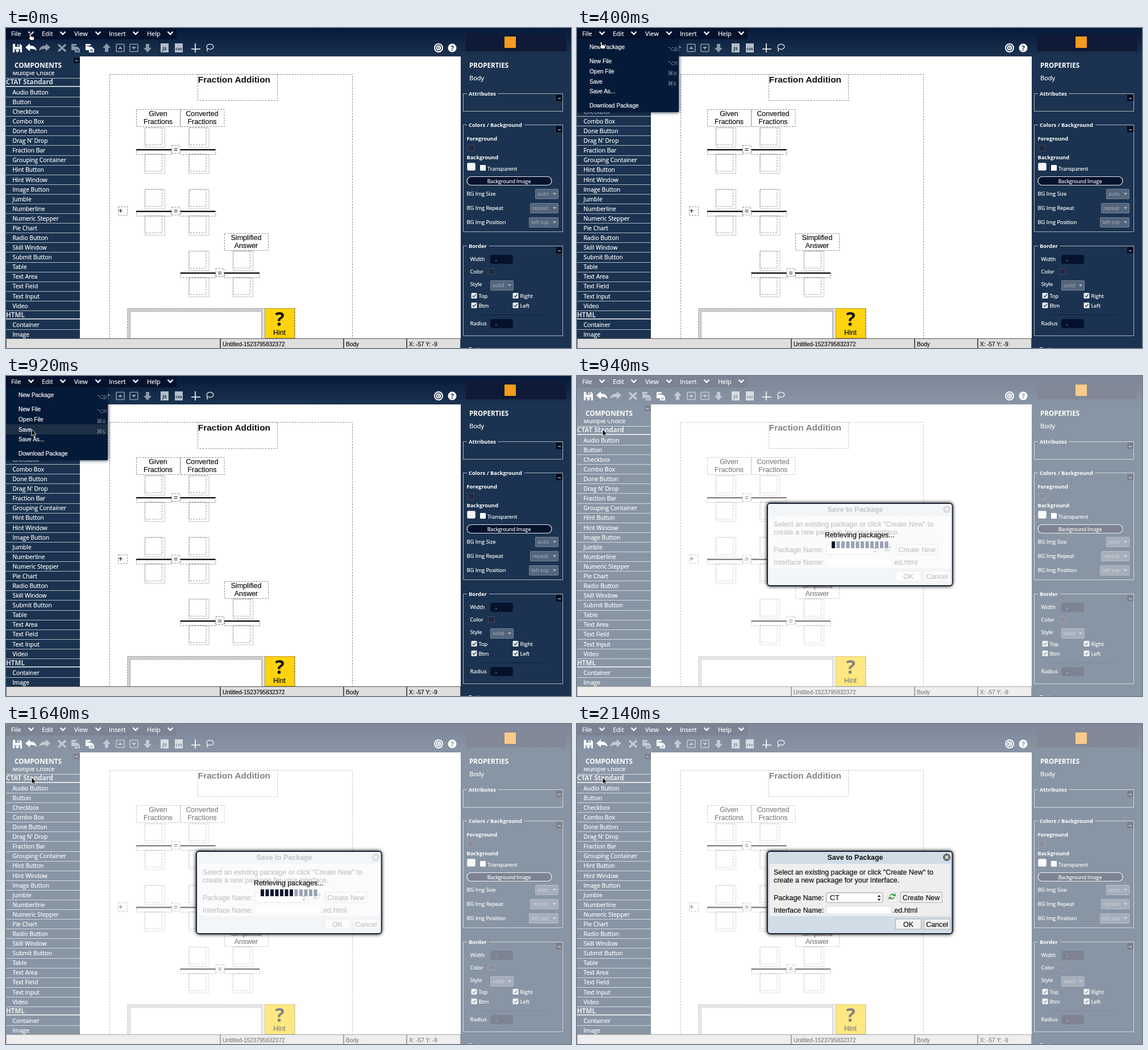
An HTML page that plays this animation: 994x563 px, repeating every 2180 ms.

```html
<!DOCTYPE html>
<html lang="en">
<head>
<meta charset="utf-8">
<title>Interface editor: saving to a package</title>
<style>
html, body { margin: 0; width: 100%; height: 100%; overflow: hidden; background: #fff; }
svg { display: block; width: 994px; height: 563px; }
text {
  font-family: "Open Sans", "Noto Sans", sans-serif; white-space: pre;
  color: #fff; fill: currentColor; stroke: currentColor; stroke-width: .2;
}
.b { font-weight: 700; stroke: none; }
.a { font-family: "Liberation Sans", Arial, sans-serif; color: #111; }
.w { color: #fff; fill: #fff; }
.g { fill: #8b97a8; }
.h { color: #d3d9e0; }
.m { text-anchor: middle; }
.k { font-family: "DejaVu Sans", sans-serif; color: #8a93a3; stroke: none; }
.muted { color: #a9b3c0; stroke: none; }
.navy { color: #1b3350; }
.help { font-family: "Open Sans", "Noto Sans", sans-serif; }
.dash { fill: none; stroke: #888; stroke-dasharray: 3 2; }
.line { fill: none; stroke: #fff; stroke-width: 2; }
.dim { fill: none; stroke: #8b97a8; stroke-width: 2; }
</style>
</head>
<body>
<svg id="stage" viewBox="0 0 994 563"></svg>
<script>
const PANEL = '#1b3350', DARK = '#05122d';

// y is the middle of the capital letters
const text = (x, y, s, size, cls = '') =>
  `<text x="${x}" y="${(y + size * .36).toFixed(2)}" font-size="${size}" class="${cls}">${s}</text>`;
const rect = (x, y, w, h, fill, more = '') =>
  `<rect x="${x}" y="${y}" width="${w}" height="${h}" fill="${fill}" ${more}/>`;
const dash = (x, y, w, h) => `<rect x="${x + .5}" y="${y + .5}" width="${w}" height="${h}" class="dash"/>`;
const path = (d, cls = '', more = '') => `<path d="${d}" class="${cls}" ${more}/>`;
const group = (id, s, more = '') => `<g id="${id}" ${more}>${s}</g>`;
const each = (list, f) => list.map(f).join('');

function header() {
  const menus = [['File', 9, 44], ['Edit', 63, 100], ['View', 120, 162], ['Insert', 181, 228], ['Help', 248, 289]];
  return rect(0, 0, 994, 563, PANEL) + rect(0, 0, 994, 50, 'url(#top)') + rect(0, 0, 300, 20, DARK) +
    each(menus, ([s, x, v]) => text(x, 10, s, 11) +
      path(`M${v - 4.5} 6.5l4.5 4.5 4.5-4.5`, 'line', 'style="stroke-width:2.4"')) +
    rect(809, 10, 176.5, 31, '#0f1a37') + rect(877, 15, 20, 20, '#f49a1e');
}

function toolbar() {
  const arrow = (x, dir) => path(`M${x} ${35 - 8 * dir}l7 ${8 * dir}h-4v${7 * dir}h-6v${-7 * dir}h-4z`, 'g');
  const boxed = (x, dir) => rect(x - 7, 28.5, 14, 13, 'none', 'stroke="#8b97a8" stroke-width="1.6" rx="1"') +
    path(`M${x} ${35 - 3 * dir}l4 ${5 * dir}h-8z`, 'g');
  const badge = (x, s, size) => rect(x - 7, 27, 14, 16, '#b4bdc9') + text(x, 36, s, size, 'b m navy');
  const sheets = (x, cls) => path(`M${x - 7} 28h9v3h-3v8h-6z`, cls) + path(`M${x - 1} 33h5l4 4v6h-9z`, cls) +
    rect(x - 5, 31, 4, 1, PANEL) + rect(x + 1, 38, 5, 1, PANEL) + rect(x + 1, 40, 5, 1, PANEL);
  const swoop = 'M34 34l8-7v4q10-1 12 9q-5-4-12-3v4z';
  return path('M12 28h13l3 3v12h-16z', 'w') + rect(16, 28, 8, 5, PANEL) + rect(20, 29, 2, 3, '#fff') +
    rect(15, 37, 10, 6, PANEL) + path('M20 34v7m-3-3l3 4 3-4', 'line') +
    path(swoop, 'w') + path(swoop, 'g', 'transform="translate(112 0) scale(-1 1)"') +
    path('M92 29l13 12m0-12l-13 12', 'dim', 'style="stroke-width:3.5"') +
    sheets(122, 'g') + sheets(147, 'w') +
    arrow(177, 1) + boxed(201, 1) + boxed(225, -1) + arrow(249, -1) +
    badge(279, 'Js', 9) + badge(304, 'css', 7.5) +
    path('M333 27v16m-7-6h16', 'line', 'style="stroke-width:1.6"') +
    '<ellipse cx="359" cy="33" rx="6" ry="4.5" fill="none" stroke="#d3d9e0" stroke-width="1.4"/>' +
    path('M355 36q-3 2 0 5', 'line', 'style="stroke-width:1.3"') +
    '<circle cx="761" cy="35" r="7" class="line"/><circle cx="761" cy="35" r="3.5" class="line"/>' +
    path('M760 33l4 2-4 2z', 'w') +
    '<circle cx="785" cy="35" r="7.5" fill="#fff"/>' + text(785, 35.2, '?', 12, 'b m navy');
}

function components() {
  const names = ['Audio Button', 'Button', 'Checkbox', 'Combo Box', 'Done Button', "Drag N' Drop", 'Fraction Bar',
    'Grouping Container', 'Hint Button', 'Hint Window', 'Image Button', 'Jumble', 'Numberline', 'Numeric Stepper',
    'Pie Chart', 'Radio Button', 'Skill Window', 'Submit Button', 'Table', 'Text Area', 'Text Field', 'Text Input', 'Video'];
  const rule = (y, h = 1) => rect(0, y, 130, h, '#fff', `opacity="${h > 1 ? .9 : .65}"`);
  const item = (s, y) => text(11.5, y, s, 10.25) + rule(Math.round(y + 8));
  return text(15, 66, 'COMPONENTS', 11.7, 'b') + rect(119, 52, 11, 10, DARK) + rect(122, 57, 4, 1, '#fff') +
    `<g clip-path="url(#list)">${item('Multiple Choice', 79.5)}</g>` +
    text(0, 95, 'CTAT Standard', 11.6, 'b h') + rule(102, 1.6) +
    each(names, (s, i) => item(s, 113 + i * 17.09)) +
    text(0, 504.5, 'HTML', 11.6, 'b h') + rule(511, 1.6) + item('Container', 522) + item('Image', 539);
}

function canvasArea() {
  const label = (x, y, a, b) => dash(x, y, 77, 30) +
    text(x + 38.5, y + 7.5, a, 12.4, 'a m') + text(x + 38.5, y + 21.5, b, 12.4, 'a m');
  const cell = (x, y) => rect(x + .5, y + .5, 35, 34, 'none', 'stroke="#c4c4c4"') +
    path(`M${x + .5} ${y + .5}h30v30h-30z`, 'dash', 'style="stroke:#999"');
  const fraction = (x, y) => cell(x + 15, y) + cell(x + 15, y + 46.5) + dash(x, y + 39, 62, 8) +
    rect(x, y + 38, 62, 2.4, '#111');
  const pair = (x, y) => fraction(x, y) + fraction(x + 77.5, y) + dash(x + 62, y + 31, 14.5, 14) +
    text(x + 69.5, y + 38.5, '=', 12.4, 'a m');
  return rect(130, 50, 670, 496, '#fff') + `<g clip-path="url(#page)">` +
    dash(182, 81, 427, 480) + dash(337, 81, 140, 46) +
    text(337.8, 90, 'Fraction Addition', 15.45, 'a b') +
    label(229, 143, 'Given', 'Fractions') + label(306.5, 143, 'Converted', 'Fractions') +
    pair(229, 175) + pair(229, 283.5) + pair(306.5, 392) + label(384, 361, 'Simplified', 'Answer') +
    dash(197, 314, 16, 15) + text(198, 322, '+', 12.4, 'a') +
    rect(214, 493, 241, 60, '#e4e4e4') + rect(214, 493, 238, 60, '#d0d0d0') +
    rect(218.5, 498.5, 231, 60, '#fff', 'stroke="#aaa"') + dash(213, 493, 295, 60) +
    rect(455.5, 493.5, 52, 52, '#ffd30d', 'stroke="#b99a20"') +
    text(481.5, 512, '?', 34, 'a b m help') + text(481, 535.5, 'Hint', 12.4, 'a m') + '</g>';
}

function statusBar() {
  const cells = [[0, 377, ''], [377, 217, 'Untitled-1523795832372'], [594, 111, 'Body'], [705, 95, 'X: -57 Y: -9']];
  return each(cells, ([x, w, s]) => rect(x + .5, 546.5, w - 1, 17, '#dedede', 'stroke="#555"') +
    text(x + 4, 556, s, 10, 'a'));
}

function properties() {
  const minus = y => rect(968, y, 11, 11, '#03091c') + rect(971, y + 6, 5, 1, '#fff');
  const fieldset = (y, bottom, s, w) =>
    path(`M811 ${y}h-6.5V${bottom}H979.5V${y}H${817 + w}`, 'dim', 'style="stroke-width:1;stroke:#a9b3c0"') +
    text(814, y, s, 9.35, 'b') + minus(y + 2);
  const select = (x, y, w, s) => rect(x + .5, y - 8.5, w, 17, '#53647b', 'rx="1" stroke="#75839a"') +
    text(x + 4, y, s, 9.3, 'muted') + path(`M${x + w - 9} ${y - 2}h6l-3 4z`, '', 'fill="#a9b3c0"');
  const check = (x, y, s) => rect(x, y - 5, 10, 10, '#e9ecef', 'rx="1.5"') +
    path(`M${x + 2.5} ${y}l2 2.5 3.5-5`, '', 'fill="none" stroke="#4a5563" stroke-width="1.5"') + text(x + 13, y + 1, s, 9.3);
  const swatch = (x, y) => rect(x + .5, y + .5, 11, 10, '#23283f', 'stroke="#3d4c66"');
  const field = y => rect(852, y - 8, 40, 16, DARK, 'rx="4"') + rect(861, y + 2, 2.5, 1, '#9aa5b5');
  return text(815, 66, 'PROPERTIES', 11.6, 'b') + text(815, 88.5, 'Body', 11) +
    fieldset(115.5, 146.5, 'Attributes', 48) +
    fieldset(170.5, 358.5, 'Colors / Background', 95) +
    text(810.5, 195, 'Foreground', 9.3, 'b') + swatch(812, 206) +
    text(810.5, 227.5, 'Background', 9.3, 'b') +
    rect(811.5, 237.5, 14, 13, '#f4f4f4', 'rx="2" stroke="#b8bec6"') +
    rect(834, 241, 10, 10, '#fff', 'rx="1"') + text(847, 248, 'Transparent', 9.3) +
    rect(811, 261.5, 149, 15, DARK, 'rx="7.5" stroke="#e4e8ee" stroke-width="1.2"') +
    text(885, 269.5, 'Background Image', 8.8, 'm') +
    text(810.5, 291.5, 'BG Img Size', 9.3) + select(931, 292, 40, 'auto') +
    text(810.5, 316.5, 'BG Img Repeat', 9.3) + select(922, 317, 49, 'repeat') +
    text(810.5, 341.5, 'BG Img Position', 9.3) + select(920, 342, 51, 'left top') +
    fieldset(383.5, 541.5, 'Border', 33) +
    text(816.5, 407, 'Width', 9.3) + field(407) +
    text(816.5, 428.5, 'Color', 9.3) + swatch(848, 423) +
    text(816.5, 450.5, 'Style', 9.3) + select(852, 453, 40, 'solid') +
    check(818.5, 471, 'Top') + check(891.5, 471, 'Right') + check(818.5, 488, 'Btm') + check(891.5, 488, 'Left') +
    rect(835, 504, 114, 1, '#0b1f38') + text(816.5, 519.5, 'Radius', 9.3) + field(520) +
    text(814, 565, 'Text', 9.3, 'b');
}

const rows = [[33, 'New Package', '⌥p'], [58, 'New File', '⌥n'], [76, 'Open File', '⌘o'],
  [94, 'Save', '⌘s'], [111.5, 'Save As...', ''], [136, 'Download Package', '']];

function menu() {
  return rect(0, 20, 179, 128, DARK, 'filter="url(#soft)"') + rect(0, 20, 179, 128, '#051a38') +
    rect(0, 0, 179, 18, '#1d2f45', 'id="hover"') +
    each(rows, ([y, s, key]) => text(22, y, s, 10.05, 'a w') + text(159.5, y + 3.5, key, 10, 'k'));
}

function dialog() {
  const button = (x, y, w, s) => rect(x + .5, y + .5, w, 18, '#f3f3f3', 'stroke="#aaa"') +
    text(x + w / 2 + .5, y + 10, s, 12.4, 'a m');
  const controls = (id, w, value) => group(id,
    rect(438.5, 297, w, 17, '#fff', 'rx="3" stroke="#999"') + text(445, 305.5, value, 12.4, 'a') +
    path(`M${w + 429} 304.5l3-4 3 4zm0 3l3 4 3-4z`, '', 'fill="#333"') +
    rect(w + 447.5, 296.5, 16, 16, '#f6f6f6', 'stroke="#ddd"') +
    path(`M${w + 451} 302q4-5 7-1m2-3v4h-4m3 3q-4 5-7 1m-2 3v-4h4`, '', 'fill="none" stroke="#3b9a3e" stroke-width="2"') +
    button(w + 469, 295.5, 73, 'Create New'));
  return rect(334, 223, 327, 147, '#000', 'rx="6" filter="url(#soft)"') +
    rect(335, 224, 325.5, 145, '#d0dde7', 'rx="5" stroke="#1b2436" stroke-width="2"') +
    rect(339, 246, 318, 92, '#eee') +
    text(489.5, 235, 'Save to Package', 12.4, 'a b m') +
    '<circle cx="650.5" cy="234.5" r="6" fill="#777" stroke="#444"/>' +
    path('M648 232l5 5m0-5l-5 5', 'line', 'style="stroke-width:1.5"') +
    text(346, 261, 'Select an existing package or click "Create New" to', 12.4, 'a') +
    text(346, 274.5, 'create a new package for your interface.', 12.4, 'a') +
    text(346, 305.5, 'Package Name:', 12.4, 'a') + text(346, 327.5, 'Interface Name:', 12.4, 'a') +
    rect(438.5, 320.5, 114, 14, '#fff', 'stroke="#ddd"') + text(555, 327.5, '.ed.html', 12.4, 'a') +
    controls('ready', 99.5, 'CT') + controls('empty', 92, '') +
    button(560, 342.5, 45, 'OK') + button(610, 342.5, 46, 'Cancel') +
    group('wait', rect(336, 225, 323.5, 143, '#fff', 'rx="4" opacity=".75"') +
      text(436, 280, 'Retrieving packages...', 12.4, 'a') +
      each([...Array(12).keys()], i => rect(448 + i * 8.5, 291, 6, 12, '#9aa2b3', 'class="bar"')));
}

const hand = path('M-1.5 1q1.5-2 3 0v4.5l4 .8q2 .5 2 2.5l-1 4h-6q-2-2-4-5 0-1.5 2.5 0z', '',
  'fill="#fff" stroke="#000" stroke-width="1.1"');
const pointer = path('M0 0v11.5l2.6-2.4 1.9 4.2 2-.9-1.900-4.100h3.6z', '',
  'fill="#000" stroke="#fff" stroke-width=".9"');

const stage = document.getElementById('stage');
stage.innerHTML = `<defs>
  <clipPath id="list"><rect y="77" width="130" height="20"/></clipPath>
  <clipPath id="page"><rect x="130" y="50" width="670" height="496"/></clipPath>
  <linearGradient id="top" x2="0" y2="1"><stop stop-color="#07193a"/><stop offset="1" stop-color="${PANEL}"/></linearGradient>
  <filter id="soft" x="-20%" y="-20%" width="140%" height="140%"><feGaussianBlur stdDeviation="3"/></filter></defs>` +
  header() + toolbar() + components() + canvasArea() + properties() + statusBar() + group('menu', menu()) +
  group('modal', rect(0, 0, 994, 563, '#fff', 'opacity=".48"') + dialog()) +
  group('cursor', group('hand', hand) + group('pointer', pointer));

const $ = id => document.getElementById(id);
const bars = [...document.querySelectorAll('.bar')];
const show = (id, on) => $(id).style.display = on ? '' : 'none';

const LOOP = 2180, OPEN = 200, SAVE = 940, READY = 1900, STEP = 110;
const track = [[0, 42.5, 9], [300, 42.5, 9], [400, 42.5, 24], [600, 46.5, 78], [920, 45, 94], [LOOP, 45, 94]];

function cursorAt(t) {
  const i = track.findIndex(k => k[0] > t);
  const [t0, x0, y0] = track[i - 1], [t1, x1, y1] = track[i];
  const p = (t - t0) / (t1 - t0), e = p * p * (3 - 2 * p);
  return [x0 + (x1 - x0) * e, y0 + (y1 - y0) * e];
}

function draw(now) {
  const t = now % LOOP, [x, y] = cursorAt(t);
  const saving = t >= SAVE, ready = t >= READY, inMenu = y > 26;
  show('menu', t >= OPEN && !saving);
  show('modal', saving);
  show('ready', ready);
  show('empty', !ready);
  show('wait', !ready);

  const row = inMenu && rows.find(r => Math.abs(r[0] - y) < 9);
  show('hover', row);
  if (row) $('hover').setAttribute('y', row[0] - 9);

  const count = 1 + Math.floor((t - SAVE) / STEP);
  bars.forEach((bar, i) => bar.setAttribute('fill', i < count ? '#0d1733' : '#9aa2b3'));

  $('cursor').setAttribute('transform', `translate(${x} ${y})`);
  show('hand', !inMenu);
  show('pointer', inMenu);
}

const start = performance.now();
(function tick() {
  draw(performance.now() - start);
  requestAnimationFrame(tick);
})();
</script>
</body>
</html>
```
